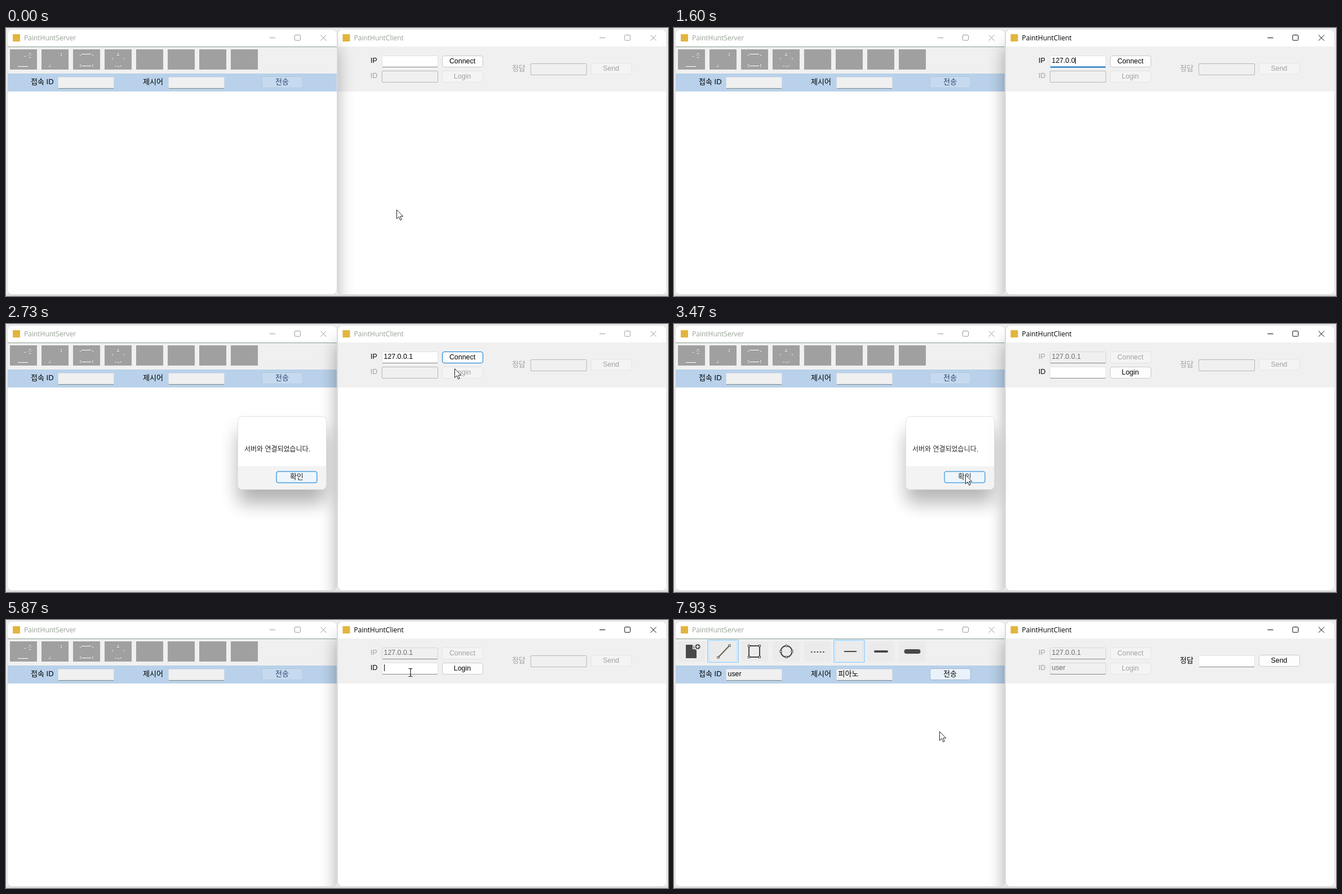
Animation, 1175 px wide and 477 px high, one loop 8000 ms. Source, as an HTML page:

```html
<!DOCTYPE html>
<html lang="ko">
<head>
<meta charset="utf-8">
<title>Server and client</title>
<style>
html, body { margin: 0; width: 100%; height: 100%; overflow: hidden; background: #ececec; }
svg { display: block; width: 100vw; height: 100vh; }
text { font: 12.4px "Liberation Sans", "Noto Sans CJK KR", "Noto Sans CJK", sans-serif; fill: #000; white-space: pre; }
text.ko { font-size: 13px; }
.title text { font: 12px "Open Sans", "Noto Sans", sans-serif; }
.title path { fill: none; stroke: #000; }
.title.off text { fill: #98a096; }
.title.off path { stroke: #9a9a9a; }
.label.off { fill: #a0a0a0; }

.btn rect { fill: #fdfdfd; stroke: #cacaca; }
.btn text { text-anchor: middle; }
.btn.off rect { fill: #f4f4f4; stroke: #e4e4e4; }
.btn.off text { fill: #a0a0a0; }
.btn.fading rect { fill: #f3f3f3; stroke: #e4e4e4; }
.btn.focus rect { stroke: #0078d4; }
.btn.hover rect { fill: #e0eef9; stroke: #0067b8; }
.btn.down rect { fill: #cce4f7; stroke: #005499; }
#deliver rect { fill: #e9f1fb; stroke: #9db4cd; }
#deliver.off rect { fill: #c6daef; stroke: #b2c7de; }
#deliver.off text { fill: #27466f; }

.input rect { fill: #fff; stroke: #e2e2e2; }
.input path { stroke: #858585; fill: none; }
.input.off rect { fill: #f0f0f0; stroke: #b6b6b6; }
.input.off path { stroke: #b6b6b6; }
.input.done rect { fill: #f0f0f0; stroke: #d6d6d6; }
.input.done text { fill: #6d6d6d; }
.input.focus path { stroke: #0067c0; stroke-width: 2; }
#who rect, #word rect { fill: #f0f0f0; stroke: #d3dce6; }

.icons path, .icons rect, .icons circle { fill: none; stroke: #484848; stroke-width: 2; }
.icons .knob { fill: #f5f5f5; stroke-width: 1; }
.icons .solid { fill: #484848; stroke: none; }
</style>
</head>
<body>
<svg id="stage" viewBox="0 0 1175 477" xmlns="http://www.w3.org/2000/svg"></svg>
<script>
const LOOP = 8000, STEP = 1000 / 15;

const box = (x, y, w, h, fill, extra = '') =>
  `<rect x="${x}" y="${y}" width="${w}" height="${h}" fill="${fill}" ${extra}/>`;
const label = (id, x, y, text, cls = '') =>
  `<text id="${id}" class="label ${cls}" x="${x}" y="${y}">${text}</text>`;
const button = (id, x, y, text, cls = '') =>
  `<g id="${id}" class="btn"><rect x="${x + .5}" y="${y + .5}" width="72" height="20" rx="3.5"/>` +
  `<text class="${cls}" x="${x + 36}" y="${y + 14}">${text}</text></g>`;
const input = (id, x, y, cls = '') =>
  `<g id="${id}" class="input"><rect x="${x - .5}" y="${y + .5}" width="99" height="20" rx="1.5"/>` +
  `<path d="M${x} ${y + 20.5}h98"/><text class="${cls}" x="${x + 2.5}" y="${y + 13}"></text></g>`;
const titleBar = (id, x, text) =>
  `<g id="${id}" class="title">${box(x + 9, 11, 13, 13, '#e3b53f')}` +
  `<text x="${x + 29}" y="22">${text}</text>` +
  `<path d="M${x + 465} 17.5h10M${x + 555.5} 12.5l10 10m0-10l-10 10"/>` +
  `<path d="M${x + 511} 12.5h7q1.5 0 1.5 1.5v6.500q0 1.500-1.500 1.500h-7q-1.500 0-1.500-1.500v-6.500q0-1.500 1.500-1.500z"/></g>`;
const shadow = (id, x, y, w, h, opacity) =>
  box(x, y, w, h, '#000', `id="${id}" rx="8" opacity="${opacity}" filter="url(#blur)"`);
const knobs = (...points) =>
  points.map(([x, y]) => `<rect class="knob" x="${x - 1.5}" y="${y - 1.5}" width="3" height="3"/>`).join('');

const slots = [...Array(8).keys()].map(i => 7 + 56 * i);
const tiles = color => slots.map(x => box(x, 38, 48, 36, color)).join('');

const lockedTools = tiles('#a0a0a0') +
  `<path stroke="#fff" fill="none" d="M21 68.500h18M33 50.500h2M41 45.500h3M40 48.500h1M44 48.500h1M41 52.500h3
    M97 45.500h2M97 48.500h2M78 65.500h1M76 68.500h3
    M134 46.500h17M131 48.500h2M153 48.500h2M134 67.500h17M131 65.500h2M131 68.500h2M153 65.500h2M153 68.500h2
    M198 45.500h2M197 48.500h4M188 54.500h2M209 54.500h2M194 67.500h2M198 68.500h3M203 67.500h2"/>`;

const selected = x => box(x + .5, 35.5, 55, 40, '#cfe8fc', 'stroke="#8fcbfb" rx="1"');
const openTools = selected(59) + selected(283) + tiles('#ebebeb') + `<g class="icons">
  <path class="solid" d="M21 44h12v8h7v16h-19zM34.500 45l5.500 5.500h-5.500z"/>
  <circle cx="42" cy="47.500" r="5.500" style="fill:#484848;stroke:#ebebeb"/>
  <path d="M39 47.500h6m-3-3v6" style="stroke:#fff;stroke-width:1.500"/>
  <path d="M79 66l19-20" style="stroke:#69644a"/>${knobs([78.500, 66.500], [98.500, 45.500])}
  <rect x="133" y="46" width="19" height="20"/>${knobs([133, 46], [152, 46], [133, 66], [152, 66])}
  <circle cx="199.500" cy="56" r="10"/>${knobs([199.500, 46], [199.500, 66], [189.500, 56], [209.500, 56])}
  <path d="M243 57h24" stroke-dasharray="2.500 2.800"/>
  <path d="M302 56h22"/>
  <path d="M357 56h21" style="stroke-width:4;stroke-linecap:round"/>
  <path d="M412.500 56h21" style="stroke-width:8;stroke-linecap:round"/></g>`;

document.getElementById('stage').innerHTML = `
<defs>
  <filter id="blur" filterUnits="userSpaceOnUse" x="-100" y="-100" width="1400" height="750"><feGaussianBlur stdDeviation="16"/></filter>
  <clipPath id="left"><rect x="3" y="3" width="584" height="471" rx="8"/></clipPath>
  <clipPath id="right"><rect x="589" y="3" width="583" height="471" rx="8"/></clipPath>
</defs>
${box(0, 0, 1175, 477, '#ececec')}
${box(0, 474, 1175, 3, '#dcdcdc')}
${box(2.5, 2.5, 585, 472, '#d4d4d4', 'rx="8"')}
${box(588, 2.5, 584.5, 472, '#d4d4d4', 'rx="8"')}
<g clip-path="url(#left)">
  ${box(3, 3, 584, 471, '#fff')}
  ${box(3, 33, 584, 1, '#8a9c8e')}
  ${box(3, 34, 584, 47, '#f0f0f0')}
  ${box(3, 81, 584, 32, '#b9d1ea')}
  ${titleBar('serverTitle', 3, 'PaintHuntServer')}
  <g id="locked">${lockedTools}</g><g id="open">${openTools}</g>
  ${label('whoLabel', 44, 100, '접속 ID', 'ko')}${input('who', 93, 87)}
  ${label('wordLabel', 243, 100, '제시어', 'ko')}${input('word', 289, 87, 'ko')}
  ${button('deliver', 454, 86, '전송', 'ko')}
  ${shadow('clientShadow', 589, 33, 583, 471, .38)}
</g>
<g clip-path="url(#right)">
  ${box(589, 3, 583, 471, '#fff')}
  ${box(589, 33, 583, 80, '#f0f0f0')}
  ${titleBar('clientTitle', 588.5, 'PaintHuntClient')}
  ${label('ipLabel', 647, 62, 'IP')}${input('ip', 668, 49)}${button('connect', 774, 49, 'Connect')}
  ${label('idLabel', 647, 89, 'ID')}${input('user', 668, 76)}${button('login', 774, 76, 'Login')}
  ${label('answerLabel', 898, 76, '정답', 'ko')}${input('answer', 932, 63)}${button('send', 1038, 62, 'Send')}
  ${shadow('serverShadow', 3, 33, 584, 471, .32)}
</g>
<rect id="caret" width="1" height="12"/>
<g id="dialog">
  ${shadow('dialogShadow', 412, 190, 156, 129, .3)}
  ${box(411.5, 164.5, 157, 130, '#fff', 'rx="8" stroke="#e0e0e0"')}
  <path d="M412 253h156v33q0 8-8 8h-140q-8 0-8-8z" fill="#f3f3f3"/>
  <text x="423" y="227" style="font-size:12px;fill:#222">서버와 연결되었습니다.</text>
  ${box(480, 262.5, 72, 20, '#eef6fc', 'rx="3.5" stroke="#4a9fe0" stroke-width="1.500"')}
  <text class="ko" x="504" y="276" style="fill:#222">확인</text>
</g>
<g id="pointer">
  <path id="arrow" d="M.5.5v16l3.700-3.500 2.600 6 2.500-1.100-2.600-5.700h5z" fill="#fff" stroke="#222"/>
  <path id="beam" d="M-3.500-6.500h2.500l1 1 1-1h2.500M0-5.500v12M-3.500 7.500h2.500l1-1 1 1h2.500" fill="none" stroke="#222" stroke-width="1.200"/>
</g>`;

const $ = id => document.getElementById(id);
const show = (id, on) => $(id).style.display = on ? '' : 'none';
const mark = (id, states) => {
  for (const name in states) $(id).classList.toggle(name, states[name]);
};
const write = (id, text) => $(id).querySelector('text').textContent = text;
const typed = (text, times, t) => text.slice(0, times.filter(at => t >= at).length);
const clamp = v => Math.min(1, Math.max(0, v));

// start, end, from, to, sag of the path
const moves = [
  [0, 667, [693, 323], [695, 61], 0],
  [2067, 2333, [695, 61], [829, 57], 0],
  [2600, 3267, [829, 57], [517, 268], 0],
  [3600, 4133, [517, 268], [718, 93], 0],
  [6667, 7067, [718, 93], [811, 93], 12],
  [7600, 7933, [811, 93], [471, 198], 62],
];

function pointerAt(t) {
  const [start, end, a, b, sag] = moves.filter(m => t >= m[0]).pop();
  const k = clamp((t - start) / (end - start)), u = k * k * (3 - 2 * k);
  return [a[0] + (b[0] - a[0]) * u, a[1] + (b[1] - a[1]) * u + sag * 4 * u * (1 - u)];
}

function render(now) {
  const t = Math.floor((now % LOOP + 4) / STEP) * STEP + 1;
  const within = (...spans) => spans.some(([a, b]) => t >= a && t < b);
  const active = t >= 733, connected = t >= 3330, loggedIn = t >= 7200, playing = t >= 7266;
  const [x, y] = pointerAt(t);

  mark('serverTitle', { off: true });
  mark('clientTitle', { off: !active || within([2600, 3330]) });
  show('serverShadow', !active);
  show('clientShadow', active);

  mark('ipLabel', { off: connected });
  mark('ip', { done: connected, focus: within([733, 2466]) });
  mark('connect', {
    off: connected,
    focus: within([2466, 3330]),
    hover: x > 774 && within([2133, 2466], [2533, 2666]),
    down: within([2466, 2533]),
  });
  write('ip', typed('127.0.0.1', [1000, 1066, 1200, 1266, 1400, 1533, 1600, 1733, 1933], t));

  const idOpen = connected && !loggedIn;
  mark('idLabel', { off: !idOpen });
  mark('user', { off: !connected, done: loggedIn, focus: within([6733, 7200]) });
  mark('login', {
    off: !idOpen,
    hover: x > 774 && within([6733, 7000]),
    down: within([7000, 7066]),
    fading: within([7066, 7200]),
  });
  write('user', typed('user', [6200, 6266, 6400, 6466], t));

  mark('answerLabel', { off: !loggedIn });
  mark('answer', { off: !loggedIn });
  mark('send', { off: !loggedIn });

  show('locked', !playing);
  show('open', playing);
  mark('deliver', { off: !playing });
  write('who', playing ? 'user' : '');
  write('word', playing ? '피아노' : '');

  const onIp = t < 2466, field = $(onIp ? 'ip' : 'user').querySelector('text');
  show('caret', within([800, 2466], [4200, 4466], [4800, 5266], [5866, 6800]));
  $('caret').setAttribute('x', Math.round(670.5 + field.getComputedTextLength()));
  $('caret').setAttribute('y', onIp ? 52 : 79);

  show('dialog', within([2600, 3733]));
  $('dialog').style.opacity = Math.min(clamp((t - 2533) / 200), clamp((3667 - t) / 210));

  const top = onIp ? 49 : 76;
  const overField = x >= 668 && x < 767 && y >= top && y < top + 21 && !loggedIn;
  show('pointer', !within([933, 1866], [6133, 6666]));
  show('arrow', !overField);
  show('beam', overField);
  $('pointer').setAttribute('transform', `translate(${Math.round(x)} ${Math.round(y)})`);
}

const begin = performance.now();
(function tick() {
  render(performance.now() - begin);
  requestAnimationFrame(tick);
})();
</script>
</body>
</html>
```
